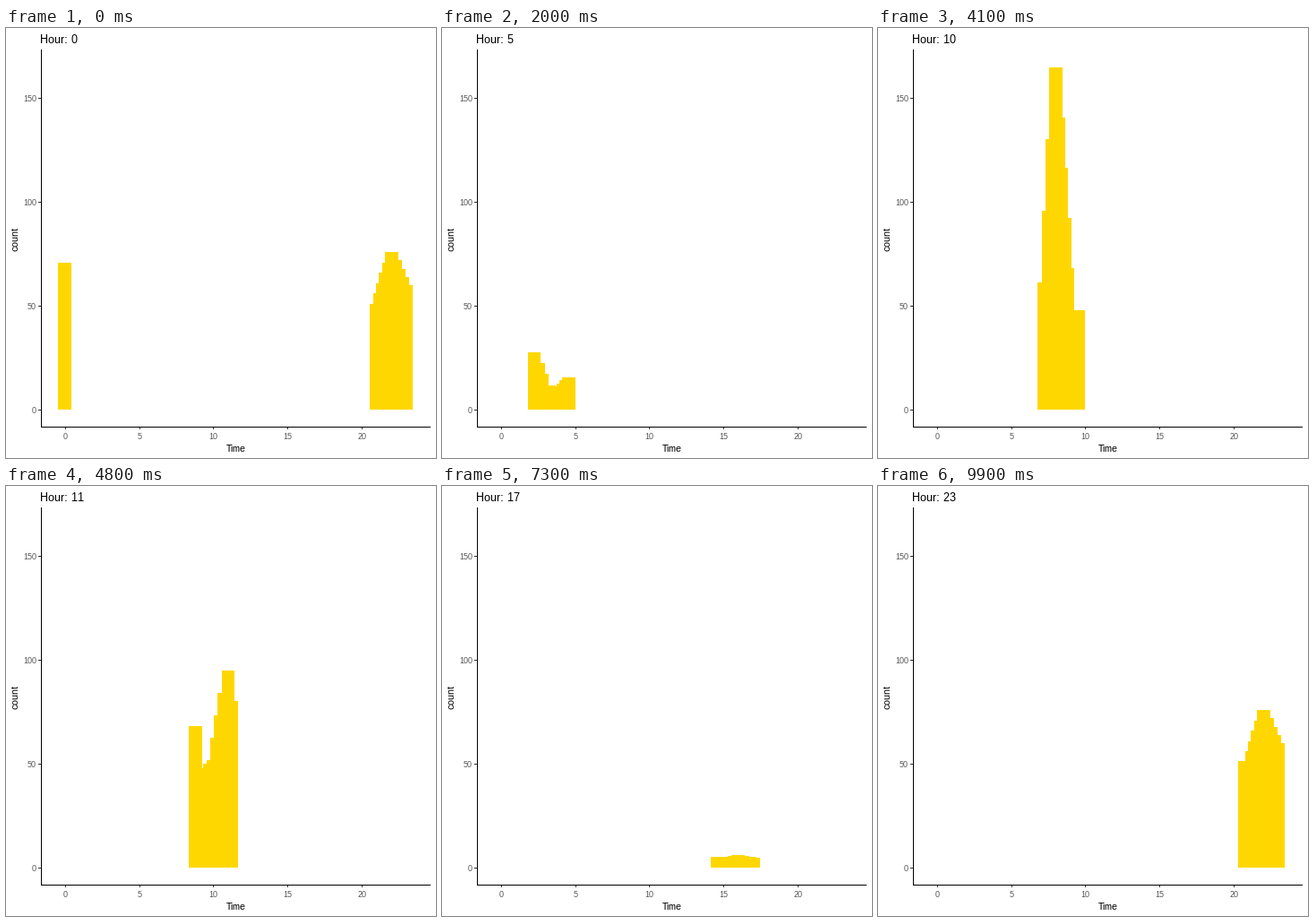
A matplotlib script for the animation above (10 s loop, 480 by 480 pixels).

```python
import numpy as np
import matplotlib.pyplot as plt
from matplotlib.animation import FuncAnimation
from matplotlib.patches import Rectangle

SIZE = 480
DPI = 72
FRAMES = 100
WAKE = 10
GOLD = "#FFD700"
COUNTS = [71, 46, 33, 12, 11, 19, 24, 27, 165, 44, 52, 95,
          22, 12, 6, 5, 6, 5, 4, 17, 53, 51, 76, 60]

plt.rcParams.update({
    "font.family": "Liberation Sans",
    "text.hinting": "native",
    "text.hinting_factor": 1,
})

# Every hour sits on a whole frame; bars move linearly between them.
hours = np.arange(24)
keys = np.round(hours * (FRAMES - 1) / 23)
steps = np.arange(FRAMES)
centers = np.interp(steps, keys, hours)
heights = np.interp(steps, keys, COUNTS)


def px(x):
    return round(65.7 + 16.575 * x)


def py(y):
    return round(426.4 - 2.32 * y)


fig = plt.figure(figsize=(SIZE / DPI, SIZE / DPI), dpi=DPI, facecolor="white")
ax = fig.add_axes([0, 0, 1, 1])
ax.set_xlim(0, SIZE)
ax.set_ylim(SIZE, 0)
ax.axis("off")


def box(x, y, w, h, color):
    return ax.add_patch(Rectangle((x, y), w, h, fc=color, lw=0,
                                  antialiased=False))


def label(x, y, text, size, color="black", ha="center", **kw):
    return ax.text(x, y, text, fontsize=size, color=color, ha=ha, **kw)


bars = [box(0, 0, 0, 0, GOLD) for _ in range(WAKE + 1)]

box(39, 24, 1, 422, "black")
box(39, 445, 435, 1, "black")
for v in range(0, 25, 5):
    if v <= 20:
        box(px(v), 446, 1, 2, "#333333")
        label(px(v) + 0.5, 459, str(v), 9, "#4D4D4D", va="baseline")
for v in range(0, 151, 50):
    box(36, py(v), 3, 1, "#333333")
    label(34, py(v) + 4, str(v), 9, "#4D4D4D", ha="right", va="baseline")

label(256.5, 473, "Time", 11, va="baseline")
label(15, 235.5, "count", 11, ha="right", va="center", rotation=90)
title = label(38.5, 17, "", 13, ha="left", va="baseline")


def update(i):
    for k, bar in enumerate(bars):
        j = (i - k) % FRAMES
        left, right = px(centers[j] - 0.45), px(centers[j] + 0.45)
        top = py(heights[j])
        bar.set_bounds(left, top, right - left, py(0) - top)
    title.set_text(f"Hour: {round(i * 23 / (FRAMES - 1))}")
    return [*bars, title]


anim = FuncAnimation(fig, update, frames=FRAMES, interval=100,
                     repeat=True, repeat_delay=0, blit=False)
plt.show()
```
